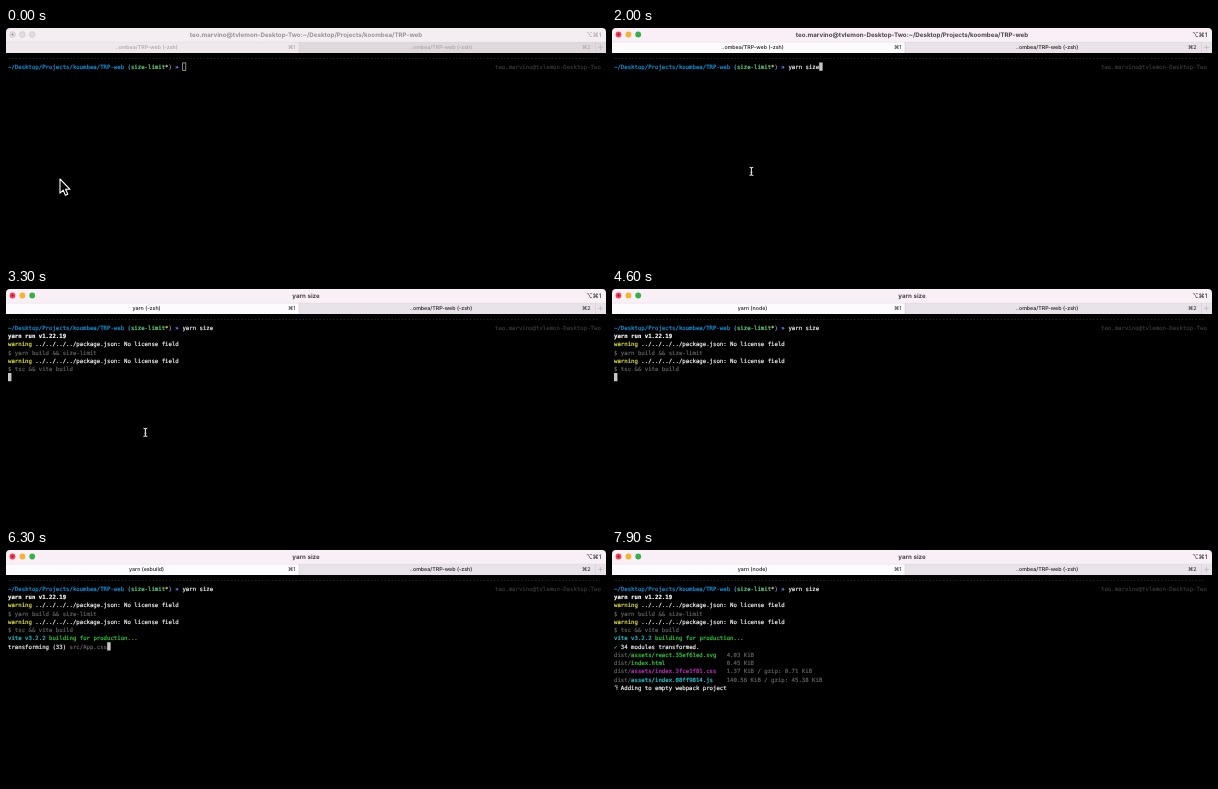
Animation of 600 by 233 pixels, one loop 8000 ms. Source, as an HTML page:

```html
<!DOCTYPE html>
<html lang="en">
<head>
<meta charset="utf-8">
<title>Terminal build</title>
<style>
  html, body { margin: 0; width: 100%; height: 100%; overflow: hidden; background: #000; }
  svg { display: block; width: 600px; height: 233px; }
  text { white-space: pre; text-rendering: geometricPrecision; }
  .term { font: 5.68px "DejaVu Sans Mono", "DejaVu Sans", monospace; stroke-width: .18; }
  .title { font: 700 6.2px Inter, sans-serif; text-anchor: middle; fill: #464247; }
  .tab { font: 500 5.3px Inter, sans-serif; text-anchor: middle; fill: #1c1b1c; }
  .key { font: 500 5.3px Inter, "DejaVu Sans", sans-serif; text-anchor: end; fill: #333; }
  .bold { font-weight: 700; }
  .idle .title { fill: #979297; }
  .idle .tab, .idle .key { fill: #aaa5aa; }
  .bar { fill: #f9f0f7; }
  .front { fill: #fefbfe; }
  .back { fill: #e9e2e8; }
  .idle .bar { fill: #f4edf2; }
  .idle .front { fill: #efe9ee; }
  .idle .back { fill: #dfd9de; }
  .idle .light { fill: #e2dce1; stroke: #c4bec3; stroke-width: .5; }
  .idle .dot { fill: #8c878b; }
</style>
</head>
<body>
<svg id="stage" viewBox="0 0 600 233">
  <rect width="600" height="233"/>
  <g id="chrome">
    <path class="bar" d="M0 14V4A4 4 0 0 1 4 0H596A4 4 0 0 1 600 4V14Z"/>
    <rect class="front" y="14" width="293" height="11"/>
    <rect class="back" x="293" y="14" width="307" height="11"/>
    <path d="M0 14.2H600" stroke="#dad4d9" stroke-width=".5"/>
    <path d="M293 14V25M589.5 14V25" stroke="#cfc9ce" stroke-width=".5"/>
    <circle class="light" cx="6.5" cy="6.5" r="2.9" fill="#fb3d56"/>
    <circle class="dot" cx="6.5" cy="6.5" r=".9" fill="#7c1620"/>
    <circle class="light" cx="16.4" cy="6.5" r="2.9" fill="#f6b32e"/>
    <circle class="light" cx="26.2" cy="6.5" r="2.9" fill="#36b04a"/>
    <text class="key" x="595.3" y="8.6" style="font-size:6.2px">⌥⌘1</text>
    <text class="key" x="289.5" y="21.1">⌘1</text>
    <text class="key" x="584.5" y="21.1">⌘2</text>
    <path d="M592 19.4h5M594.5 16.9v5" stroke="#b5afb4" stroke-width=".6"/>
    <text class="tab" x="435" y="21.1">..ombea/TRP-web (-zsh)</text>
  </g>
  <g id="screen"></g>
  <path id="arrow" d="M0 0V14.2L3.2 11.2L5.4 16.3L7.8 15.2L5.6 10.3H10Z"
        fill="#000" stroke="#fff" stroke-width="1.1" stroke-linejoin="round"/>
  <path id="beam" d="M-1.9 -4.1Q0 -4.1 0 -2.9Q0 -4.1 1.9 -4.1M0 -3V3M-1.9 4.1Q0 4.1 0 2.9Q0 4.1 1.9 4.1M-1 .9H1"
        fill="none" stroke="#e4e4e4" stroke-width="1.1"/>
</svg>
<script>
const LOOP = 8000, COL = 3.42, ROW = 8.25, LEFT = 2, BASE = 40.8;
const GREY = '#626262', DIM = '#363636', GREEN = '#2fd03a', CYAN = '#22cfd8',
      YELLOW = '#e8e840', PINK = '#c832c8', WHITE = '#f4f4f4';
const $ = id => document.getElementById(id);
const chrome = $('chrome'), screen = $('screen');
const timed = [];

function add(parent, tag, attrs, from = 0, to = LOOP) {
  const node = document.createElementNS('http://www.w3.org/2000/svg', tag);
  for (const key in attrs) node.setAttribute(key, attrs[key]);
  parent.append(node);
  timed.push({ node, from, to });
  return node;
}

// parts: alternating colour and text
function line(row, col, from, to, ...parts) {
  const text = add(screen, 'text', { class: 'term', x: LEFT + col * COL, y: BASE + row * ROW }, from, to);
  for (let i = 0; i < parts.length; i += 2) {
    const span = document.createElementNS(text.namespaceURI, 'tspan');
    span.setAttribute('fill', parts[i]);
    span.setAttribute('stroke', parts[i]);
    span.textContent = parts[i + 1];
    text.append(span);
  }
  return text;
}

function block(row, col, from, to) {
  return add(screen, 'rect', {
    x: LEFT + col * COL, y: 34.5 + row * ROW, width: COL, height: ROW, fill: '#c7c7c7'
  }, from, to);
}

function label(cls, x, y, text, from, to) {
  add(chrome, 'text', { class: cls, x, y }, from, to).textContent = text;
}

const host = 'teo.marvino@tvlemon-Desktop-Two';
label('title', 300, 8.6, host + ':~/Desktop/Projects/koombea/TRP-web', 0, 2600);
label('title', 300, 8.6, 'yarn size', 2600);
[[0, '..ombea/TRP-web (-zsh)'], [2700, 'yarn (-zsh)'], [3500, 'yarn (node)'],
 [6300, 'yarn (esbuild)'], [7700, 'yarn (node)']]
  .forEach(([from, name], i, all) => label('tab', 140.5, 21.1, name, from, all[i + 1]?.[0]));

// Prompt
line(-1.05, 0, 0, LOOP, DIM, '-'.repeat(173));
line(0, 0, 0, LOOP, '#1594dc', '~/Desktop/Projects/koombea/TRP-web ', '#5fafff', '(',
  '#5fe08a', 'size-limit', '#ffc83c', '*', '#5fafff', ')', '#8787ff', ' » ');
line(0, 142.4, 0, LOOP, DIM, host);

// Typed command
line(0, 51, 1400, 1500, WHITE, 'ya');
line(0, 51, 1500, 2000, WHITE, 'yarn');
line(0, 51, 2000, LOOP, WHITE, 'yarn size');
add(screen, 'rect', {
  x: 176.7, y: 34.9, width: 3.1, height: 7.6, fill: 'none', stroke: '#c7c7c7', 'stroke-width': .7
}, 0, 800);
block(0, 51, 800, 1400);
block(0, 53, 1400, 1500);
block(0, 56, 1500, 2000);
block(0, 60, 2000, 2500);
block(1, 0, 2500, 2900);

// Build output
line(1, 0, 2900, LOOP, '#fff', 'yarn run v1.22.19').classList.add('bold');
block(2, 0, 2900, 3000);
[[2, 3000, 'yarn build && size-limit'], [4, 3300, 'tsc && vite build']].forEach(([row, at, cmd]) => {
  line(row, 0, at, LOOP, YELLOW, 'warning', WHITE, ' ../../../../package.json: No license field');
  line(row + 1, 0, at, LOOP, GREY, '$ ' + cmd);
});
block(4, 0, 3000, 3300);
block(6, 0, 3300, 5700);
line(6, 0, 5700, LOOP, CYAN, 'vite v3.2.2 ', GREEN, 'building for production...');
block(7, 0, 5700, 5800);

const dom = 'node_modules/react-dom/cjs/react-dom.production.min.js';
[[5800, 1, 'index.html'], [5900, 4, 'src/main.tsx'], [6000, 28, dom],
 [6100, 32, dom], [6300, 33, 'src/App.css']].forEach(([from, count, file], i, all) => {
  const to = all[i + 1]?.[0] ?? 6600, head = `transforming (${count}) `;
  line(7, 0, from, to, WHITE, head, GREY, file);
  block(7, head.length + file.length, from, to);
});

line(7, 0, 6600, LOOP, GREEN, '✓', WHITE, ' 34 modules transformed.');
block(8, 0, 6600, 6700);
[[6700, 1], [6800, 4]].forEach(([from, count]) => {
  const text = `rendering chunks (${count})...`;
  line(8, 0, from, from + 100, WHITE, text);
  block(8, text.length, from, from + 100);
});
[['assets/react.35ef61ed.svg', GREEN, '4.03 KiB'],
 ['index.html', GREEN, '0.45 KiB'],
 ['assets/index.3fce1f81.css', PINK, '1.37 KiB / gzip: 0.71 KiB'],
 ['assets/index.08ff9814.js', CYAN, '140.56 KiB / gzip: 45.38 KiB']].forEach(([file, color, size], i) =>
  line(8 + i, 0, 6900, LOOP, GREY, 'dist/', color, file.padEnd(28), GREY, size));
block(12, 0, 6900, 7100);

// Spinner
[[7100, 7700, '⠋'], [7700, 7900, '⠙'], [7900, LOOP, '⠹']].forEach(([from, to, dots]) =>
  line(12, 0, from, to, WHITE, dots));
line(12, 2, 7100, LOOP, WHITE, 'Adding to empty webpack project');

const arrow = $('arrow'), beam = $('beam');
timed.push({ node: arrow, from: 0, to: 800 }, { node: beam, from: 800, to: 4600 });
const place = (node, x, y) => node.setAttribute('transform', `translate(${x} ${y})`);
const steps = (t, start, count) => Math.min(1, Math.max(0, Math.floor((t - start) / 100) + 1) / count);
const ease = p => p * p * (3 - 2 * p);

function draw(t) {
  for (const { node, from, to } of timed)
    node.style.visibility = t >= from && t < to ? 'visible' : 'hidden';
  chrome.classList.toggle('idle', t < 800);
  const a = ease(steps(t, 100, 4));
  place(arrow, 54 + 88 * a, 151 - 8.8 * a);
  const b = ease(steps(t, 4100, 5));
  place(beam, 139.4 - 111 * b, (t < 1400 ? 142.7 : 143.3) + 27.4 * b);
}

const start = performance.now();
function tick() {
  draw((performance.now() - start) % LOOP);
  requestAnimationFrame(tick);
}
tick();
</script>
</body>
</html>
```
